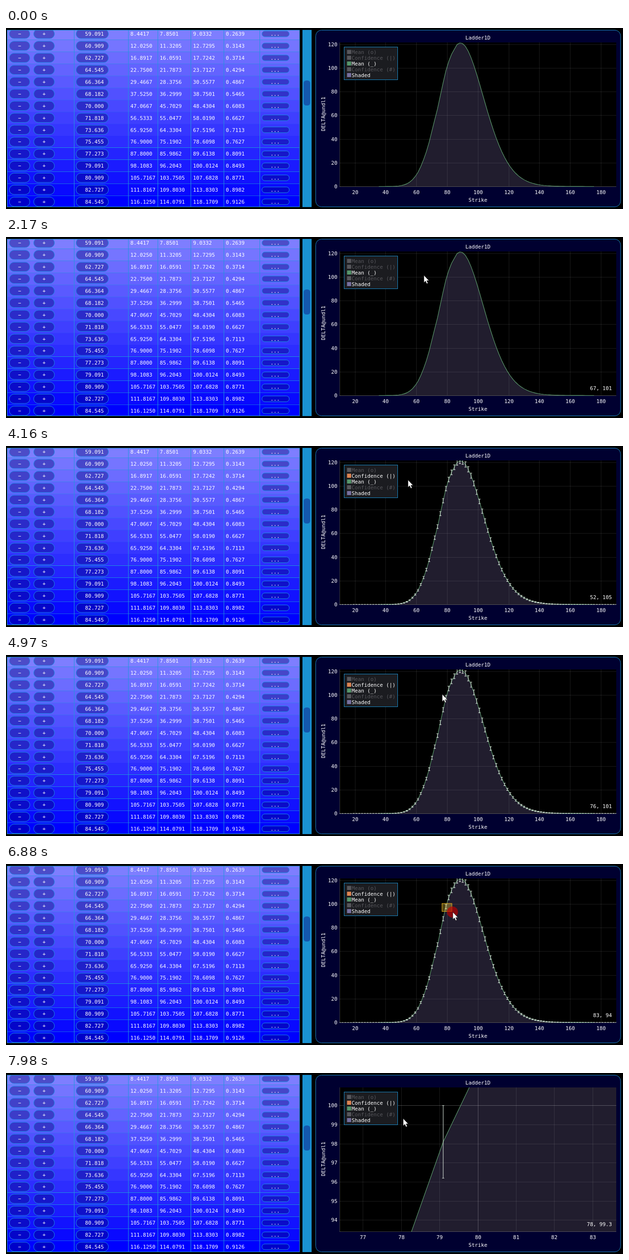
An HTML page that plays this animation: 1280x376 px, repeating every 8 s.

```html
<!DOCTYPE html>
<html lang="en">
<head>
<meta charset="utf-8">
<title>Ladder1D</title>
<style>
  html, body { margin: 0; width: 100%; height: 100%; overflow: hidden; background: #000; }
  svg { display: block; width: 100vw; height: 100vh; }
  text { font: 10.8px "DejaVu Sans Mono", monospace; fill: #fff; white-space: pre; }
  .mid { text-anchor: middle; }
  .end { text-anchor: end; }
  .rule { fill: none; stroke: #1e96dc; }
  .button { fill: rgba(0, 0, 120, .4); stroke: #1c8ce6; }
  .frame { stroke: #1b88c4; }
  .grid { stroke: #fff; stroke-opacity: .1; }
  .major { stroke-opacity: .25; }
  .axis { stroke: #fff; stroke-opacity: .22; }
  .shade { fill: #8172b3; fill-opacity: .26; }
  .curve { fill: none; stroke: #5f9f70; stroke-width: 1.1; }
  .bars { fill: none; stroke: #dfeae2; stroke-width: 1.15; stroke-opacity: .9; }
  .off { fill: #57575c; }
  .selection { fill: rgba(255, 215, 60, .32); stroke: #e2ac18; }
  .press { fill: rgba(190, 0, 0, .66); }
</style>
</head>
<body>
<svg id="stage" viewBox="0 0 1280 376" preserveAspectRatio="none">
  <defs>
    <clipPath id="tableClip"><rect x="2" y="4" width="608" height="368"/></clipPath>
    <clipPath id="plotClip"><rect x="692" y="30" width="574" height="300"/></clipPath>
  </defs>
</svg>
<script>
const LOOP = 8000;
const TICK = 70;
const stage = document.getElementById('stage');

function add(parent, tag, attrs = {}, content) {
  const node = document.createElementNS('http://www.w3.org/2000/svg', tag);
  for (const name in attrs) node.setAttribute(name, attrs[name]);
  if (content !== undefined) node.textContent = content;
  parent.append(node);
  return node;
}
const line = (parent, x1, y1, x2, y2, cls) => add(parent, 'line', { x1, y1, x2, y2, class: cls });
const rect = (parent, x, y, width, height, attrs) => add(parent, 'rect', { x, y, width, height, ...attrs });
const label = (parent, x, y, content, cls = '') => add(parent, 'text', { x, y: y + 4, class: cls }, content);
const show = (node, on) => node.setAttribute('display', on ? 'inline' : 'none');

// Listed mean and lower bound; the upper bound and standard error follow from them
const LISTED = `8.4417 7.8501, 12.0250 11.3205, 16.8917 16.0591, 22.7500 21.7873, 29.4667 28.3756,
  37.5250 36.2999, 47.0667 45.7029, 56.5333 55.0477, 65.9250 64.3304, 76.9000 75.1902,
  87.8000 85.9862, 98.1083 96.2043, 105.7167 103.7505, 111.8167 109.8030, 116.1250 114.0791`;
const Z = 2.24182;
const FIRST_ROW = 27;
const strikeAt = k => 10 + 180 * k / 99;

const rows = LISTED.split(',').map((entry, i) => {
  const [listed, low] = entry.trim().split(' ').map(Number);
  const mean = Math.round(listed * 120) / 120;
  return { x: strikeAt(FIRST_ROW + i), mean, low, high: 2 * mean - low, error: (listed - low) / Z };
});

// Bell curve over the square root of the strike
function bell(x) {
  const u = 2 * (Math.sqrt(x) - Math.sqrt(88.5));
  return 121.5 * Math.exp(-u * u / (4.78 + .1 * u));
}
function sampleAt(k) {
  const x = strikeAt(k), mean = bell(x), spread = Z * .093 * Math.sqrt(mean);
  return { x, mean, low: mean - spread, high: mean + spread };
}
const samples = Array.from({ length: 100 }, (_, k) => rows[k - FIRST_ROW] || sampleAt(k));

function buildTable() {
  const table = add(stage, 'g', { 'clip-path': 'url(#tableClip)' });
  rows.forEach((row, i) => {
    const y = 12.2 + 24.92 * i;
    const tint = 126 - 9 * i;
    const button = (x, width, half, content, shift = 0) => {
      rect(table, x, y - half, width, 2 * half, { rx: half, class: 'button' });
      label(table, x + width / 2 + shift, y, content, 'mid');
    };
    rect(table, 2, y - 12.46, 607, 25, { fill: `rgb(${tint},${tint},255)` });
    button(7, 42.5, 9.7, '−');
    button(57.5, 43, 9.7, '+');
    button(145.5, 67, 9.7, row.x.toFixed(3), 4.5);
    button(531, 56.5, 6, '...', -1);
    [row.mean, row.low, row.high, row.error].forEach((value, c) =>
      label(table, [258, 319, 388, 456][c], y, value.toFixed(4)));
    const bottom = Math.round(y + 12) + .5;
    line(table, 2, bottom, 609, bottom, 'rule');
  });
  [141.5, 254, 315, 383.5, 452, 526.5].forEach(x => line(table, x, 4, x, 372, 'rule'));
  rect(table, 2.5, 4.5, 606.5, 367, { class: 'rule' });
  rect(stage, 615, 4, 19, 368, { fill: '#1a92d2' });
  rect(stage, 617.5, 109, 13.5, 52, { rx: 5.5, fill: '#1458ae' });
}

const wide = { x0: 10, y0: 0, sx: 3.189, sy: 2.4545, bottom: 329.2, xTicks: [20, 180, 20], yTicks: [0, 120, 20], digits: 0 };
const close = { x0: 76.387, y0: 93.42, sx: 79.4, sy: 39.67, bottom: 329, xTicks: [77, 83, 1], yTicks: [94, 100, 1], digits: 1 };
const toX = (view, v) => 692.3 + (v - view.x0) * view.sx;
const toY = (view, v) => view.bottom - (v - view.y0) * view.sy;

function buildView(view) {
  const group = add(stage, 'g');
  const inner = add(group, 'g', { 'clip-path': 'url(#plotClip)' });
  const visible = samples.filter(s => s.x > 35 && s.x < 176);
  const path = 'M' + visible.map(s => `${toX(view, s.x).toFixed(2)} ${toY(view, s.mean).toFixed(2)}`).join('L');
  add(inner, 'path', { class: 'shade', d: `${path}V${toY(view, 0)}H${toX(view, visible[0].x)}Z` });

  const ticks = ([from, to, step], draw) => { for (let v = from; v <= to; v += step) draw(v); };
  const gridClass = v => view === close && v % 10 === 0 ? 'grid major' : 'grid';
  ticks(view.xTicks, v => {
    const x = Math.floor(toX(view, v)) + .5;
    line(inner, x, 30, x, 329, gridClass(v));
    label(group, x, 340.5, v, 'mid');
  });
  ticks(view.yTicks, v => {
    const y = Math.floor(toY(view, v)) + .5;
    line(inner, 692, y, 1266, y, gridClass(v));
    label(group, 687.5, y - .5, v, 'end');
  });
  line(inner, 692.5, 30, 692.5, 330, 'axis');
  line(inner, 692, 329.5, 1266, 329.5, 'axis');
  add(inner, 'path', { class: 'curve', d: path });

  const bars = add(inner, 'path', {
    class: 'bars',
    d: samples.map(s => {
      const x = toX(view, s.x), low = toY(view, s.low), high = toY(view, s.high);
      return `M${x} ${low}V${high}M${x - 2.2} ${low}h4.4M${x - 2.2} ${high}h4.4`;
    }).join('')
  });
  return { group, bars };
}

function buildLegend() {
  rect(stage, 701.5, 39.5, 111, 68, { fill: '#1b1c20', class: 'frame' });
  const entries = [['Mean (o)'], ['Confidence (|)'], ['Mean (_)', '#55966a'], ['Confidence (#)'], ['Shaded', '#77709f']];
  return entries.map(([name, color], i) => {
    const y = 50 + 12 * i;
    return {
      icon: rect(stage, 707.5, y - 4.5, 8.5, 8.5, { fill: color || '#57575c' }),
      text: label(stage, 717, y, name, color ? '' : 'off')
    };
  })[1];
}

buildTable();
rect(stage, 642.5, 4.5, 632.5, 367, { rx: 12, fill: '#000030', class: 'frame' });
rect(stage, 692, 30, 574, 300, { fill: '#000' });
label(stage, 979, 19.5, 'Ladder1D', 'mid');
label(stage, 979, 357, 'Strike', 'mid');
add(stage, 'text', { class: 'mid', transform: 'translate(661.5 178.5) rotate(-90)' }, 'DELTA@undl1');
const wideView = buildView(wide);
const closeView = buildView(close);
const confidence = buildLegend();
const readout = label(stage, 1257, 314, '', 'end');
const selection = rect(stage, 904.5, 82, 0, 0, { class: 'selection' });
const press = add(stage, 'circle', { r: 11.5, class: 'press' });
const pointer = add(stage, 'path', {
  d: 'M0 0V15.2L3.4 12L5.8 17.6L8.4 16.5L6 11.2H10.6Z', fill: '#fff', stroke: '#111', 'stroke-width': .7
});

// Pointer stops: time, x, y
const STOPS = [
  [500, 1254, 150], [1270, 969, 91], [2170, 867, 80], [2940, 809, 62], [3360, 801, 61], [3630, 801, 61],
  [3990, 818, 72], [4130, 834, 71], [4340, 890, 78], [4690, 905, 82], [5770, 905, 82],
  [6510, 925, 98.5], [6790, 925, 98.5], [6860, 927, 100.5], [7900, 824, 95]
];

function pointerAt(t) {
  const next = STOPS.findIndex(stop => stop[0] > t);
  if (next === 0) return STOPS[0].slice(1);
  if (next < 0) return STOPS.at(-1).slice(1);
  const [a, b] = [STOPS[next - 1], STOPS[next]];
  const f = (t - a[0]) / (b[0] - a[0]);
  return [1, 2].map(i => a[i] + (b[i] - a[i]) * f);
}

function render(t) {
  // The readout and the selection trail the pointer by one tick
  const tick = Math.floor(t / TICK) * TICK;
  const [x, y] = pointerAt(tick);
  const [lagX, lagY] = pointerAt(tick - TICK);
  const entered = t >= 500;
  const enabled = t >= 3630;
  const zoomed = t >= 6940;
  const inLegend = x < 808;
  const view = zoomed ? close : wide;

  show(wideView.group, !zoomed);
  show(closeView.group, zoomed);
  show(wideView.bars, enabled);
  confidence.icon.setAttribute('fill', enabled ? '#dd8452' : inLegend ? '#1b82b4' : '#57575c');
  confidence.text.setAttribute('class', enabled ? '' : 'off');

  show(pointer, entered);
  pointer.setAttribute('transform', `translate(${x} ${y - .5})`);
  show(readout, entered && !inLegend);
  const values = [view.x0 + (lagX - 693.3) / view.sx, view.y0 + (view.bottom - lagY) / view.sy];
  readout.textContent = values.map(v => +v.toFixed(view.digits)).join(', ');

  show(press, t >= 5570 && !zoomed);
  press.setAttribute('cx', x - .8);
  press.setAttribute('cy', y - .8);
  show(selection, t >= 5840 && !zoomed);
  selection.setAttribute('width', Math.max(0, lagX - 904.5));
  selection.setAttribute('height', Math.max(0, lagY - 82));
}

const start = performance.now();
function loop() {
  render((performance.now() - start) % LOOP);
  requestAnimationFrame(loop);
}
loop();
</script>
</body>
</html>
```
